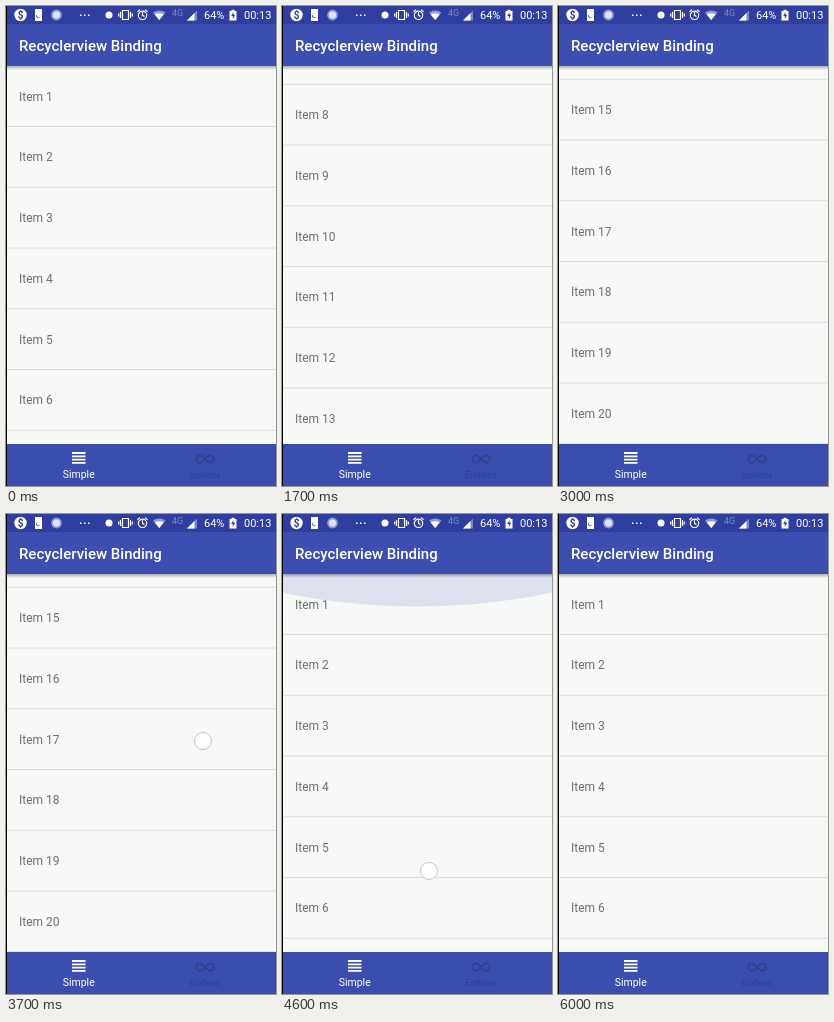
An HTML page that plays this animation: 270 px wide and 480 px high, repeating every 6100 ms.

```html
<!DOCTYPE html>
<html lang="en">
<head>
<meta charset="utf-8">
<title>Recyclerview Binding</title>
<style>
  html, body { margin: 0; width: 100%; height: 100%; overflow: hidden; background: #000; }
  svg { display: block; width: 270px; height: 480px; font-family: Roboto, sans-serif; }
  .row text { font-size: 12px; fill: #6e6f6e; }
  .row path { stroke: #dadcda; }
  .status { fill: #fff; font-size: 11px; }
  .line { fill: none; stroke: #fff; stroke-width: 1.2; }
</style>
</head>
<body>
<svg viewBox="0 0 270 480">
  <defs>
    <clipPath id="window"><path d="M1 60H270V438H1Z"/></clipPath>
    <linearGradient id="shade" x2="0" y2="1">
      <stop stop-color="#000" stop-opacity=".3"/>
      <stop offset="1" stop-color="#000" stop-opacity="0"/>
    </linearGradient>
  </defs>

  <g clip-path="url(#window)">
    <path fill="#f7f9f6" d="M0 60H270V438H0Z"/>
    <g id="list"></g>
    <ellipse id="topGlow" cx="135" rx="405" fill="#3f51b5"/>
    <ellipse id="bottomGlow" cx="135" rx="405" fill="#3f51b5"/>
    <path fill="url(#shade)" d="M0 60H270V64H0Z"/>
  </g>

  <path fill="#303f9f" d="M1 0H270V18H1Z"/>
  <path fill="#3c4fb1" d="M1 18H270V60H1Z"/>
  <text x="13" y="45" font-size="15" font-weight="500" fill="#fff">Recyclerview Binding</text>

  <g class="status">
    <circle cx="14.5" cy="9" r="6.2"/>
    <text x="14.5" y="12.6" font-size="10" font-weight="700" text-anchor="middle" fill="#303f9f">$</text>
    <path d="M29 3H36V15H29Z"/>
    <path d="M31 8.5a2 2 0 1 0 3 2.5a2 2 0 0 1-3-2.5" fill="#303f9f"/>
    <circle cx="50.5" cy="9" r="4.5" fill="#dfe3f5" stroke="#929cd0" stroke-width="1.8"/>
    <path d="M74 8.5h1.5v1.5H74zM78 8.5h1.5v1.5H78zM82 8.5h1.5v1.5H82z"/>
    <circle cx="103" cy="9" r="3.5"/>
    <path class="line" d="M116.5 4.5h6v9h-6zM114.5 6v6M124.5 6v6M112.7 7.5v3M126.3 7.5v3"/>
    <path class="line" d="M136.5 6.3v3l2 1.3M131.5 5.8l2.5-2.2M141.5 5.8L139 3.6"/>
    <circle class="line" cx="136.5" cy="9.3" r="4.2"/>
    <path d="M147 6.5Q153.200 2.500 159.400 6.500L153.200 14Z" fill="#929cd0"/>
    <path d="M148.700 8.500Q153.200 6 157.700 8.500L153.200 14Z"/>
    <text x="166" y="10" font-size="9" fill="#7d88c7">4G</text>
    <path d="M181 14.500L191 4.500V14.500Z" fill="#7d88c7"/>
    <path d="M181 14.500L188.500 7V14.500Z"/>
    <text x="198" y="13">64%</text>
    <path d="M223.500 5h2V3.800h3V5h2v9.500h-7Z"/>
    <path d="M227.500 6l-2.300 4h1.600v3l2.400-4.200h-1.700Z" fill="#303f9f"/>
    <text x="238" y="13">00:13</text>
  </g>

  <path fill="#3b4eb0" d="M1 438H270V480H1Z"/>
  <path stroke="#fff" stroke-width="1.8" d="M66 447h13.500M66 450.300h13.500M66 453.600h13.500M66 456.900h13.500"/>
  <text x="72.700" y="472" font-size="10.500" fill="#fff" text-anchor="middle">Simple</text>
  <path fill="none" stroke="#303f8e" stroke-width="1.700"
        d="M199 453C196.500 450.200 195.500 449.300 194 449.300a3.700 3.700 0 0 0 0 7.400C195.500 456.700 196.500 455.800 199 453S202.500 449.300 204 449.300a3.700 3.700 0 0 1 0 7.400C202.500 456.700 201.500 455.800 199 453Z"/>
  <text x="199" y="472" font-size="9" fill="#303f8e" text-anchor="middle">Endless</text>

  <circle id="finger" r="8.500" fill="#fff" fill-opacity=".88" stroke="#c6c8c6"/>
  <path d="M0 0H1V480H0Z"/>
</svg>

<script>
const LOOP = 6100, STEP = 100;
const TOP = 60, BOTTOM = 438, ROW = 60.75, COUNT = 20;
const END = ROW * COUNT - (BOTTOM - TOP);
const $ = id => document.getElementById(id);

// Tracks are lists of [time, value, ...] joined by straight lines.
const scrollTrack = [
  [1100, 0], [1200, 12], [1300, 65], [1400, 145], [1500, 235], [1700, 406.7],
  [1900, 570], [2100, 715], [2300, END],
  [3700, END], [3800, 800], [4000, 640], [4200, 330], [4400, 60], [4500, 0]
];
const bottomTrack = [[2300, 0, 0], [2400, .96, .45], [2500, .92, .42], [2700, .55, .13], [3000, 0, 0]];
const topTrack = [[4400, 0, 0], [4500, .65, .16], [4600, .6, .14], [4700, .48, .09], [5000, 0, 0]];
const swipes = [
  [[1200, 190, 340], [1500, 200, 200]],
  [[3600, 197, 227], [3700, 197, 227], [4000, 182, 350]],
  [[4300, 165, 235], [4600, 147, 357]]
];

function sample(track, t) {
  const i = track.findIndex(key => key[0] > t);
  if (i === 0) return track[0].slice(1);
  if (i < 0) return track[track.length - 1].slice(1);
  const a = track[i - 1], b = track[i];
  const k = (t - a[0]) / (b[0] - a[0]);
  return a.slice(1).map((v, n) => v + (b[n + 1] - v) * k);
}

function setAttrs(el, attrs) {
  for (const name in attrs) el.setAttribute(name, attrs[name]);
}

// A shallow slice of a wide circle, squashed towards the list edge.
function drawGlow(el, edge, side, [scale, alpha]) {
  setAttrs(el, { cy: edge - side * 351 * scale, ry: 405 * scale, opacity: alpha });
}

function draw(t) {
  const [offset] = sample(scrollTrack, t);
  $("list").setAttribute("transform", `translate(0 ${TOP - offset})`);
  drawGlow($("topGlow"), TOP, 1, sample(topTrack, t));
  drawGlow($("bottomGlow"), BOTTOM, -1, sample(bottomTrack, t));

  const swipe = swipes.find(s => t >= s[0][0] && t <= s[s.length - 1][0]);
  $("finger").setAttribute("visibility", swipe ? "visible" : "hidden");
  if (swipe) {
    const [cx, cy] = sample(swipe, t);
    setAttrs($("finger"), { cx, cy });
  }
}

$("list").innerHTML = Array.from({ length: COUNT }, (_, i) =>
  `<g class="row" transform="translate(0 ${i * ROW})">
    <text x="13" y="34.700">Item ${i + 1}</text><path d="M0 60.500H270"/>
  </g>`).join("");

const start = performance.now();
function tick() {
  const t = (performance.now() - start) % LOOP;
  draw(Math.floor(t / STEP) * STEP);
  requestAnimationFrame(tick);
}
tick();
</script>
</body>
</html>
```
